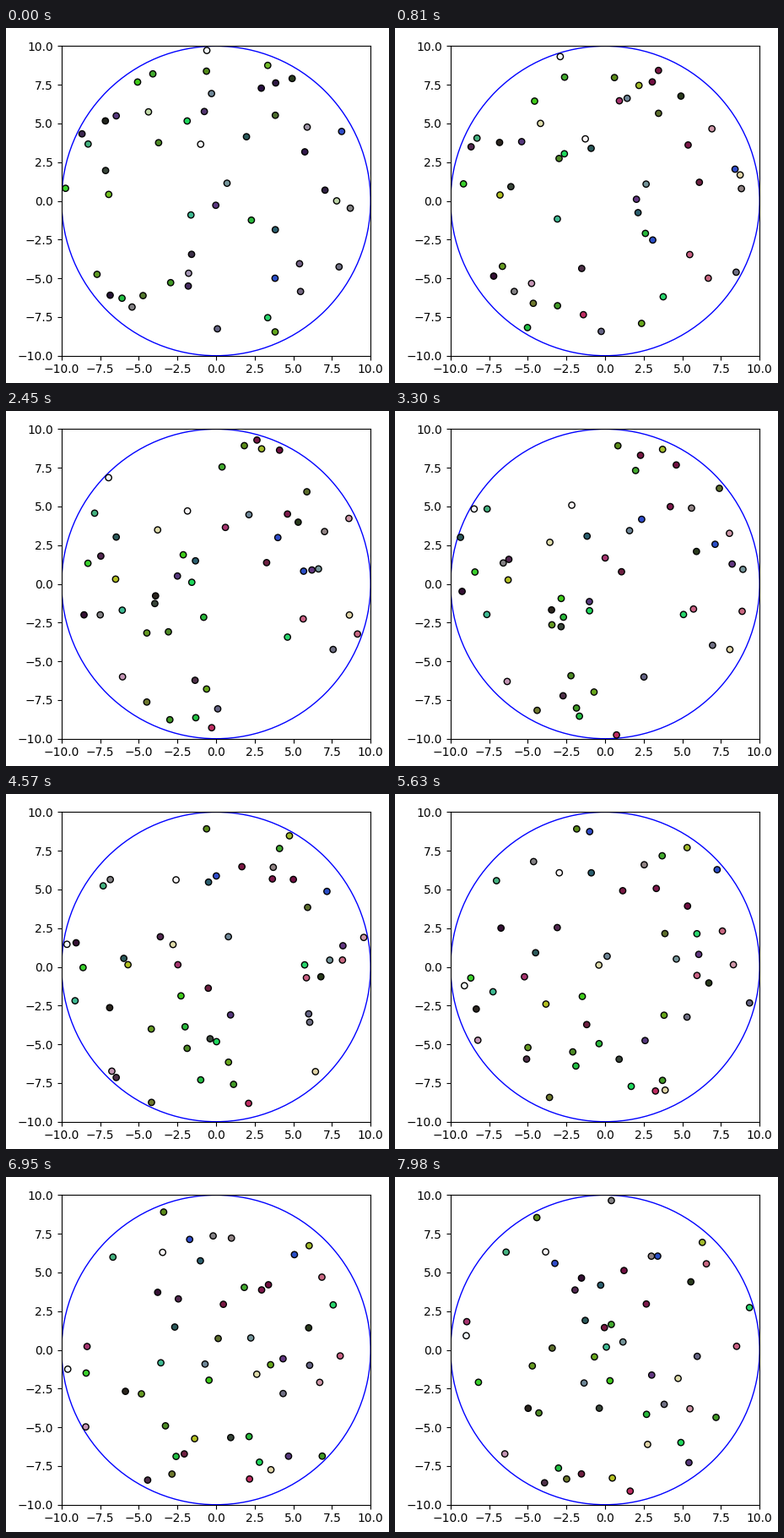
Animation, 454 px wide and 420 px high, one loop 8000 ms. Source, as a matplotlib script:

```python
import numpy as np
import matplotlib.pyplot as plt
from matplotlib.animation import FuncAnimation
from matplotlib.colors import to_rgb
from matplotlib.patches import Circle

W, H, DPI = 454, 420, 100
FRAMES, INTERVAL = 250, 32
SUBSTEPS = 2
COUNT = 50
RADIUS = 10           # of the ring
WALL = 9.8            # reach of a dot's centre
CONTACT = 0.43        # distance at which two dots bounce
SPREAD = 0.6          # least distance at the start
SPEED = 1.6           # deviation per axis, units per second
WARM_UP = 15          # frames until the reds are at full strength

SHADES = """
    28b838 40a828 30d060 38c020 60a020 48b090 508828 687020 a8c028
    781848 a83068 801840 c06080 282828 284830 503048 603878 2848c0
    285868 788898 687088 808078 c898b8 e0e0b8 f0f0f0
""".split()

rng = np.random.default_rng(12)


def scatter_starts():
    spots = []
    while len(spots) < COUNT:
        spot = rng.uniform(-WALL, WALL, 2)
        clear = all(np.hypot(*(spot - s)) > SPREAD for s in spots)
        if np.hypot(*spot) < WALL and clear:
            spots.append(spot)
    return np.array(spots)


def pick_colours():
    base = np.array([to_rgb("#" + c) for c in np.resize(SHADES, COUNT)])
    return np.clip(base + rng.normal(0, 0.03, base.shape), 0, 1)


def bounce_pairs(pos, vel):
    gap = pos[:, None] - pos[None]
    near = np.triu((gap ** 2).sum(-1) < CONTACT ** 2, 1)
    for i, j in zip(*np.nonzero(near)):
        axis = gap[i, j] / np.hypot(*gap[i, j])
        push = (vel[i] - vel[j]) @ axis
        if push < 0:
            vel[i] -= push * axis
            vel[j] += push * axis


def bounce_wall(pos, vel):
    reach = np.hypot(*pos.T)
    normal = pos / reach[:, None]
    out = (vel * normal).sum(1)
    hit = (reach > WALL) & (out > 0)
    vel[hit] -= 2 * out[hit, None] * normal[hit]


def simulate():
    pos = scatter_starts()
    vel = rng.normal(0, SPEED, (COUNT, 2))
    dt = INTERVAL / 1000 / SUBSTEPS
    track = []
    for _ in range(FRAMES):
        track.append(pos)
        for _ in range(SUBSTEPS):
            pos = pos + vel * dt
            bounce_pairs(pos, vel)
            bounce_wall(pos, vel)
    return track


track = simulate()
full = pick_colours()
muted = full.copy()
muted[:, 0] = np.minimum(full[:, 0], full[:, 1:].mean(1))

fig = plt.figure(figsize=(W / DPI, H / DPI), dpi=DPI, facecolor="white")
ax = fig.add_axes([65.9 / W, 32.3 / H, 366.3 / W, 366.3 / H])
ax.set(xlim=(-RADIUS, RADIUS), ylim=(-RADIUS, RADIUS))
ticks = np.arange(-RADIUS, RADIUS + 0.1, 2.5)
ax.set_xticks(ticks)
ax.set_yticks(ticks)
ax.add_patch(Circle((0, 0), RADIUS, fill=False, ec="blue", lw=1))
dots = ax.scatter(*track[0].T, s=28, c=muted, edgecolors="black",
                  linewidths=1, zorder=2)


def draw(n):
    mix = min(n / WARM_UP, 1)
    dots.set_offsets(track[n])
    dots.set_facecolor(muted + (full - muted) * mix)
    return dots,


anim = FuncAnimation(fig, draw, frames=FRAMES, interval=INTERVAL,
                     repeat=True, repeat_delay=0)
plt.show()
```
